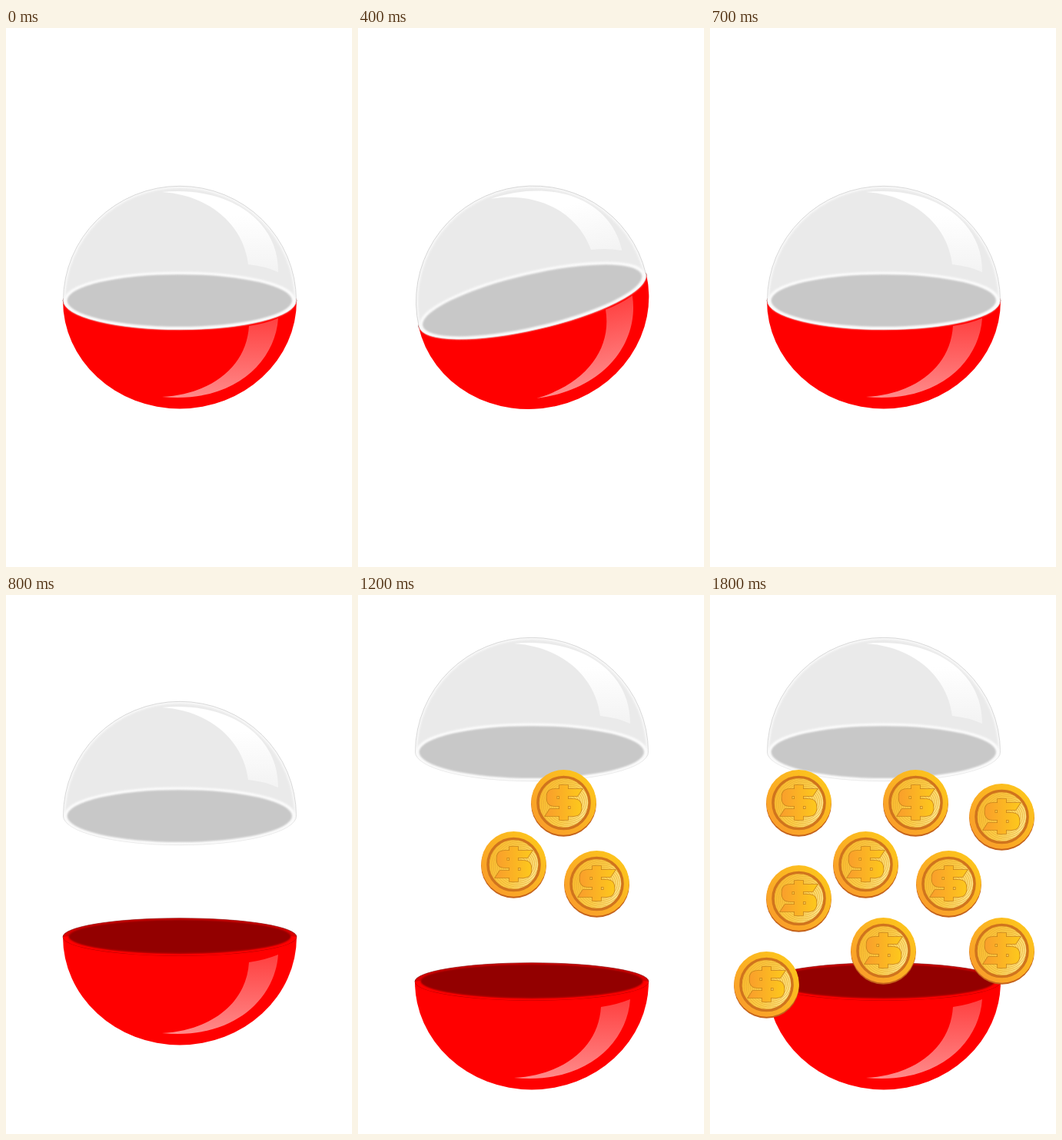
Recreate the animation shown at these times as an HTML page. Size 450 by 700 pixels, loop 1900 ms.

```html
<!DOCTYPE html>
<html>
<head>
<meta charset="utf-8">
<style>
  html, body { margin: 0; height: 100%; overflow: hidden; background: #fff; }
  svg { display: block; width: 450px; height: 700px; }
</style>
</head>
<body>
<svg viewBox="0 0 450 700">
  <defs>
    <filter id="soft" x="-10%" y="-20%" width="120%" height="140%"><feGaussianBlur stdDeviation="1"/></filter>
    <linearGradient id="domeShine" x1="0" y1="0" x2="0" y2="1">
      <stop offset=".3" stop-color="#fff"/><stop offset="1" stop-color="#f3f3f3"/>
    </linearGradient>
    <linearGradient id="bowlShine" x1="0" y1="0" x2="0" y2="1">
      <stop offset="0" stop-color="#ff4040"/><stop offset="1" stop-color="#ff8a8a"/>
    </linearGradient>
    <linearGradient id="gold">
      <stop offset="0" stop-color="#f99d2c"/><stop offset="1" stop-color="#fdc91c"/>
    </linearGradient>
    <linearGradient id="rim" x1="0" y1="1" x2="1" y2="0">
      <stop offset="0" stop-color="#f9972d"/><stop offset="1" stop-color="#fdcb1a"/>
    </linearGradient>
    <linearGradient id="face" x1="0" y1=".3" x2="1" y2=".7">
      <stop offset="0" stop-color="#fbb92b"/><stop offset=".55" stop-color="#fcd04c"/><stop offset="1" stop-color="#fdeb9c"/>
    </linearGradient>
    <clipPath id="faceClip"><circle r="32"/></clipPath>
    <g id="coin">
      <circle cy="1.3" r="42.4" fill="#c4621b"/>
      <circle cy="-.6" r="42.3" fill="url(#rim)"/>
      <circle r="33.5" fill="url(#face)" stroke="#d0741d" stroke-width="3.6"/>
      <g id="rings" clip-path="url(#faceClip)" fill="none" stroke="#e9ae31" stroke-width=".7"></g>
      <path fill="url(#gold)" stroke="#c98319" stroke-width="1.6" paint-order="stroke"
        d="M24-18H-12Q-22-18-22-7T-12 4H9V8H-18L-24 17H13Q23 17 23 6T13-5H-9V-9H18ZM-5.5-23V22H5.5V-23Z"/>
    </g>
  </defs>
  <g id="ball">
    <g id="bowl">
      <path d="M74 354A152 140.5 0 0 0 378 354Z" fill="#f00"/>
      <ellipse cx="226" cy="354" rx="152" ry="24.3" fill="#d80000" stroke="#700" stroke-width=".6"/>
      <path d="M74 354A152 24.5 0 0 0 378 354L370 353A144 23 0 0 1 82 353Z" fill="#f00"/>
      <ellipse cx="226" cy="353.5" rx="144.5" ry="22" fill="#930000" filter="url(#soft)"/>
      <path d="M354 377C350 435 295 488 203 479C270 475 313 438 316 387Q337 384 354 377Z" fill="url(#bowlShine)"/>
    </g>
    <g id="dome">
      <path d="M74.5 354A151.5 148.7 0 0 1 377.5 354A151.5 37.6 0 0 1 74.5 354Z" fill="#f8f8f8" stroke="#c9c9c9" stroke-width=".7"/>
      <path d="M77 354A149 146 0 0 1 375 354A149 36 0 0 1 77 354Z" fill="#eaeaea" filter="url(#soft)"/>
      <path d="M203 213C290 205 355 250 354 317Q336 309 315 307C309 256 265 217 203 213Z" fill="url(#domeShine)"/>
      <ellipse cx="226" cy="354" rx="148.3" ry="35.3" fill="none" stroke="#fbfbfb" stroke-width="4.5" filter="url(#soft)"/>
      <ellipse cx="225.7" cy="354" rx="146" ry="33.8" fill="#c8c8c8" filter="url(#soft)"/>
    </g>
  </g>
  <g id="coins"></g>
</svg>
<script>
const STEP = 100, LOOP = 1900, FIRST_COIN = 10;
const positions = [
  [267.5, 270], [202.5, 350], [310.5, 375],
  [115.5, 270], [115.5, 394], [379.5, 288],
  [225.5, 462], [73.5, 506], [379.5, 462]
];
const $ = id => document.getElementById(id);
const transform = (id, value) => $(id).setAttribute('transform', value);

for (let r = 5; r < 44; r += 2.6)
  $('rings').innerHTML += `<ellipse cx="6" cy="3" rx="${r}" ry="${r * .92}" transform="rotate(-25)"/>`;
$('coins').innerHTML = positions.map(([x, y]) => `<use href="#coin" x="${x}" y="${y}"/>`).join('');
const coins = [...$('coins').children];

// Shake, open in two jumps, then one more coin per step.
function draw(now) {
  const step = Math.floor(now % LOOP / STEP);
  const tilt = step > 0 && step < 7 ? (step % 2 ? 13 : -13) : 0;
  const [up, down] = step < 8 ? [0, 0] : step < 9 ? [67, 90] : [150, 148];
  transform('ball', `rotate(${tilt} 226 350)`);
  transform('dome', `translate(0 ${-up})`);
  transform('bowl', `translate(0 ${down})`);
  coins.forEach((coin, i) => coin.style.display = step >= FIRST_COIN + i ? '' : 'none');
}

let start;
function tick(now) {
  start ??= now;
  draw(now - start);
  requestAnimationFrame(tick);
}
draw(0);
requestAnimationFrame(tick);
</script>
</body>
</html>
```
